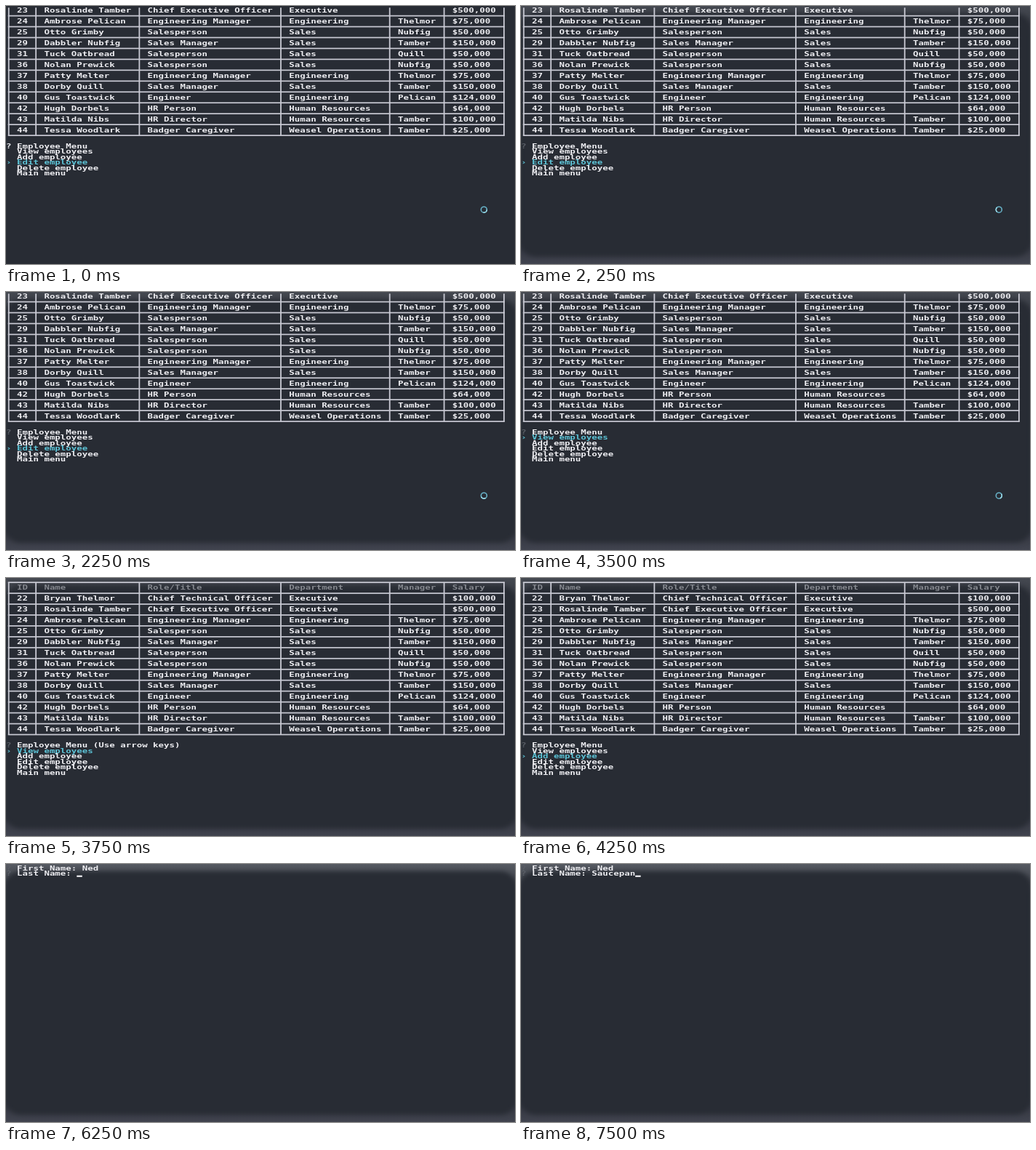
Recreate the animation shown at these times as an HTML page with a canvas. Size 700x355 px, loop 8000 ms.

```html
<!DOCTYPE html>
<html lang="en">
<head>
<meta charset="utf-8">
<title>Employee terminal</title>
<style>
html, body { margin: 0; width: 100%; height: 100%; overflow: hidden; background: #282c34; }
canvas { display: block; width: 700px; height: 355px; }
</style>
</head>
<body>
<canvas id="stage" width="700" height="355"></canvas>
<script>
const ctx = document.getElementById('stage').getContext('2d');
const W = 700, H = 355, LOOP = 8000;

// Terminal grid
const CELL = 7.485, ROW = 7.48, TOP = 6;
const FONT = 8.5;
const BG = '#282c34', WHITE = '#eeeef2', DIM = '#595d65', HEAD = '#85888f',
      CYAN = '#5cc3d6', RULE = '#c9cad4';

const COLS = [0, 5, 24, 50, 70, 80, 91];
const TABLE = `ID|Name|Role/Title|Department|Manager|Salary
22|Bryan Thelmor|Chief Technical Officer|Executive||$100,000
23|Rosalinde Tamber|Chief Executive Officer|Executive||$500,000
24|Ambrose Pelican|Engineering Manager|Engineering|Thelmor|$75,000
25|Otto Grimby|Salesperson|Sales|Nubfig|$50,000
29|Dabbler Nubfig|Sales Manager|Sales|Tamber|$150,000
31|Tuck Oatbread|Salesperson|Sales|Quill|$50,000
36|Nolan Prewick|Salesperson|Sales|Nubfig|$50,000
37|Patty Melter|Engineering Manager|Engineering|Thelmor|$75,000
38|Dorby Quill|Sales Manager|Sales|Tamber|$150,000
40|Gus Toastwick|Engineer|Engineering|Pelican|$124,000
42|Hugh Dorbels|HR Person|Human Resources||$64,000
43|Matilda Nibs|HR Director|Human Resources|Tamber|$100,000
44|Tessa Woodlark|Badger Caregiver|Weasel Operations|Tamber|$25,000`
  .split('\n').map(line => line.split('|'));
const MENU = ['View employees', 'Add employee', 'Edit employee', 'Delete employee', 'Main menu'];

const rowY = n => TOP + n * ROW;
const colX = n => n * CELL;

ctx.font = `bold ${FONT}px "DejaVu Sans Mono", monospace`;
const ASPECT = CELL / (ctx.measureText('M'.repeat(20)).width / 20);

// The terminal face is a wide one: every glyph shares the same cell aspect.
function print(text, col, row, color = WHITE) {
  ctx.save();
  ctx.translate(colX(col), rowY(row) + 3);
  ctx.scale(ASPECT, 1);
  ctx.fillStyle = color;
  ctx.fillText(text, 0, 0);
  ctx.restore();
}

function cursor(col, row) {
  ctx.fillStyle = WHITE;
  ctx.fillRect(colX(col), rowY(row) + 2.2, CELL, 2.2);
}

function background(topColor) {
  ctx.fillStyle = BG;
  ctx.fillRect(0, 0, W, H);
  if (!topColor) return;
  const edge = ctx.createLinearGradient(0, 0, 0, H);
  edge.addColorStop(0, topColor);
  edge.addColorStop(0.12, '#2e323a');
  edge.addColorStop(0.9, '#2e323a');
  edge.addColorStop(1, '#41444f');
  ctx.fillStyle = edge;
  ctx.fillRect(0, 0, W, H);
  ctx.save();
  ctx.filter = 'blur(3px)';
  ctx.fillStyle = BG;
  ctx.beginPath();
  ctx.roundRect(-2, 10, W + 4, H - 20, 22);
  ctx.fill();
  ctx.restore();
}

function table(scroll) {
  const last = TABLE.length * 2;
  const top = Math.max(2.3, rowY(-scroll)), bottom = rowY(last - scroll);
  const left = colX(0.5) - 1, right = colX(91.5) + 1;
  ctx.fillStyle = RULE;
  for (const c of COLS) ctx.fillRect(colX(c + 0.5) - 0.9, top, 1.8, bottom - top);
  for (let n = 0; n <= last; n += 2)
    if (n >= scroll) ctx.fillRect(left, rowY(n - scroll) - 0.8, right - left, 1.7);
  TABLE.forEach((cells, i) => {
    const row = i * 2 + 1 - scroll;
    if (row < 0) return;
    cells.forEach((text, c) => print(text, COLS[c] + 2, row, i ? WHITE : HEAD));
  });
}

function menu(row, selected, markColor, hint) {
  print('?', 0, row, markColor);
  print('Employee Menu' + (hint ? ' (Use arrow keys)' : ''), 2, row);
  MENU.forEach((item, i) => {
    const on = i === selected;
    if (on) print('›', 0, row + 1 + i, CYAN);
    print(item, 2, row + 1 + i, on ? CYAN : WHITE);
  });
}

function busyRing(t) {
  const start = Math.floor(t / 250) * 2.2;
  const arc = (from, to, color) => {
    ctx.strokeStyle = color;
    ctx.beginPath();
    ctx.arc(657.3, 280.2, 4, from, to);
    ctx.stroke();
  };
  ctx.lineWidth = 1.6;
  arc(0, Math.PI * 2, '#68b3c9');
  arc(start, start + 1.8, '#9bdcea');
}

function prompt(label, answer, row, active) {
  const text = label + ': ' + answer;
  print('?', 0, row, DIM);
  print(text, 2, row);
  if (active) cursor(2 + text.length, row);
}

// Letters typed by time t, `step` letters every 250 ms from `start`
function typed(word, t, start, step) {
  const beats = Math.floor((t - start) / 250) + 1;
  return word.slice(0, Math.max(0, beats * step));
}

function draw(t) {
  background(t < 250 ? null : t < 5000 ? '#454951' : '#565a62');
  if (t < 3750) {
    table(5);
    menu(25, t < 3250 ? 2 : t < 3500 ? 1 : 0, t < 250 ? WHITE : DIM);
    busyRing(t);
  } else if (t < 5000) {
    table(0);
    menu(30, t < 4250 ? 0 : 1, DIM, t < 4250);
  } else {
    const second = t >= 6250;
    prompt('First Name', typed('Ned', t, 5500, 1), 0, !second);
    if (second) prompt('Last Name', typed('Saucepan', t, 6750, 2), 1, true);
  }
}

const began = performance.now();
function tick() {
  draw((performance.now() - began) % LOOP);
  requestAnimationFrame(tick);
}
tick();
</script>
</body>
</html>
```
